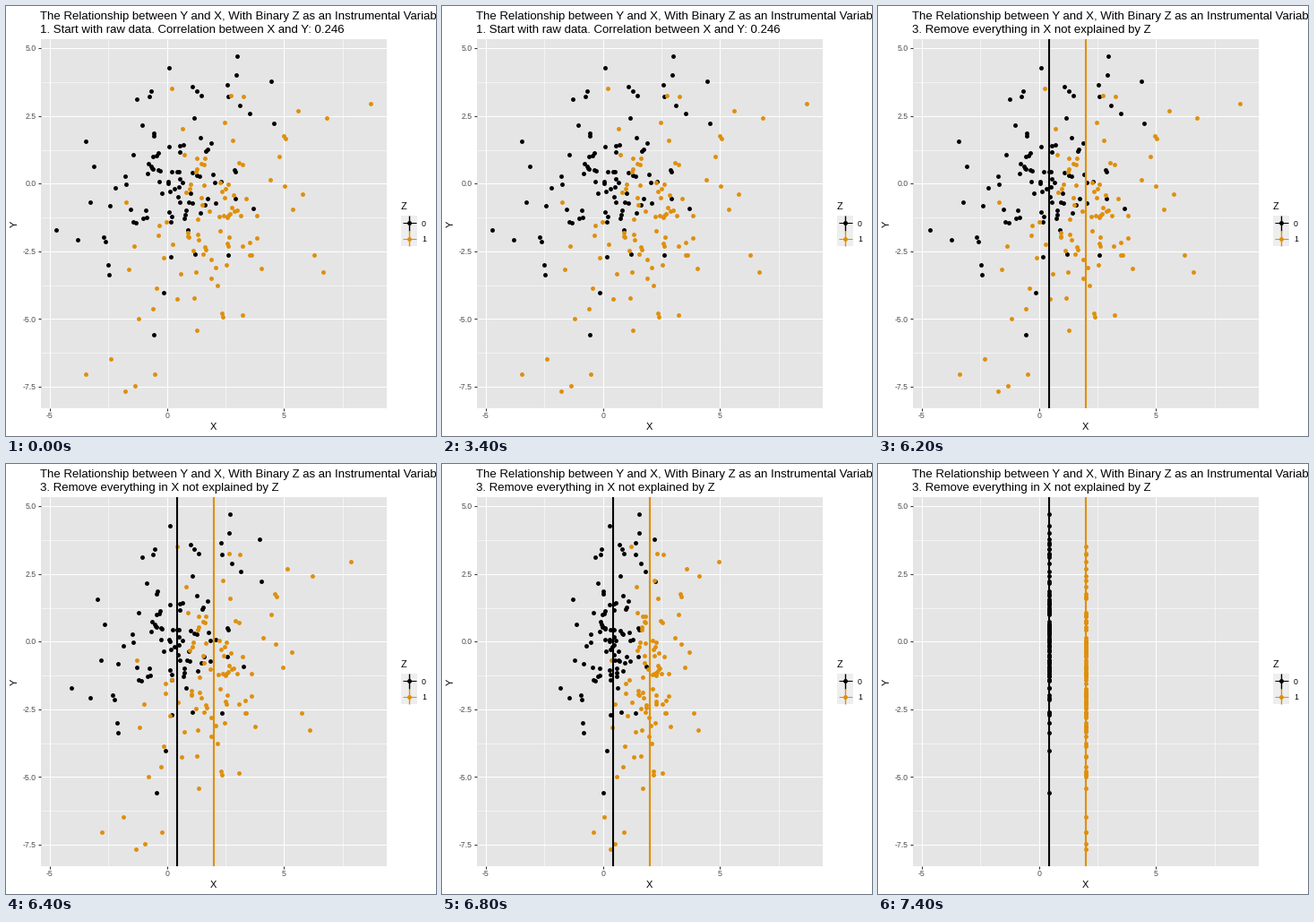
These frames come from a looping animation (480x480 px, 8 s). A matplotlib script:

```python
import numpy as np
import matplotlib.pyplot as plt
from matplotlib.animation import FuncAnimation
from matplotlib.patches import Rectangle

SIZE, DPI = 480, 100
STEP_MS, FRAMES = 100, 80
PT = 72 / DPI  # points per pixel
BLACK, ORANGE = "#000000", "#DF8F0C"
LEFT, RIGHT, TOP, BOTTOM = 38.5, 425, 37.3, 448.7
MEANS = (191, 232)

HEADING = "The Relationship between Y and X, With Binary Z as an Instrumental Variable"
STEPS = (
    "1. Start with raw data. Correlation between X and Y: 0.246",
    "2. Figure out what differences in X are explained by Z",
    "3. Remove everything in X not explained by Z",
)
TITLE_2, LINES_ON, TITLE_3 = 37, 43, 62
MOVE_START, MOVE_LENGTH = 61, 13

plt.rcParams["font.family"] = "Liberation Sans"
fig = plt.figure(figsize=(SIZE / DPI, SIZE / DPI), dpi=DPI, facecolor="white")
ax = fig.add_axes([0, 0, 1, 1])  # drawn in stage pixels, y downwards
ax.set_xlim(0, SIZE)
ax.set_ylim(SIZE, 0)
ax.axis("off")


def px(x):
    return 179.6 + 26.16 * x


def py(y):
    return 198.3 - 30.23 * y


def line(xs, ys, color, width, z=1):
    return ax.plot(xs, ys, color=color, lw=width * PT, zorder=z,
                   solid_capstyle="butt")[0]


def box(x, y, w, h, color):
    ax.add_patch(Rectangle((x, y), w, h, fc=color, ec="none", zorder=0))


def label(x, y, text, size, color="black", **kw):
    return ax.text(x, y, text, fontsize=size * PT, color=color,
                   va=kw.pop("va", "baseline"), **kw)


def dots(xs, ys, color, z=3):
    return ax.plot(xs, ys, "o", ms=4.9 * PT, mew=0, color=color, zorder=z)[0]


def cloud(seed, outer, center, spread, total=100):
    """Outlying points plus a seeded normal core cut off at two sigma."""
    rng = np.random.default_rng(seed)
    core = rng.normal(size=(4 * total, 2))
    core = core[np.hypot(*core.T) < 2][: total - len(outer)]
    return np.vstack([outer, np.array(center) + core * spread])


def draw_panel():
    box(LEFT, TOP, RIGHT - LEFT, BOTTOM - TOP, "#E5E5E5")
    for x in (-2.5, 2.5, 7.5):
        line([px(x)] * 2, [TOP, BOTTOM], "white", 0.55)
    for y in np.arange(-6.25, 4, 2.5):
        line([LEFT, RIGHT], [py(y)] * 2, "white", 0.55)
    for x in (-5, 0, 5):
        line([px(x)] * 2, [TOP, BOTTOM], "white", 1.07)
        line([px(x)] * 2, [BOTTOM, BOTTOM + 2.8], "#333333", 1.07)
        label(px(x), 460, f"{x}", 8.8, "#4D4D4D", ha="center")
    for y in np.arange(-7.5, 6, 2.5):
        line([LEFT, RIGHT], [py(y)] * 2, "white", 1.07)
        line([LEFT - 2.8, LEFT], [py(y)] * 2, "#333333", 1.07)
        label(33.5, py(y) + 3.1, f"{y:.1f}", 8.8, "#4D4D4D", ha="right")
    label(231.8, 473, "X", 11, ha="center")
    label(9.8, 243, "Y", 11, ha="center", va="center", rotation=90)


def draw_legend():
    label(441, 227, "Z", 11)
    for i, color in enumerate((BLACK, ORANGE)):
        y = 242.2 + 17.3 * i
        box(441.4, y - 8.65, 17.3, 17.3, "#EEEEEE")
        line([442.6, 457.5], [y, y], color, 1.07)
        line([450, 450], [y - 8.6, y + 8.6], color, 1.4)
        dots([450], [y], color)
        label(464, y + 3.4, f"{i}", 8.8)


draw_panel()
draw_legend()
label(38.3, 15, HEADING, 13.2)
subtitle = label(38.3, 30, STEPS[0], 13.2)

outer_black = [
    (56, 250), (80, 261), (89, 151), (94, 219), (98, 179), (109, 258),
    (111, 263), (114, 289), (115, 300), (116, 223), (122, 203), (142, 166),
    (146, 104), (152, 133), (160, 101), (162, 95), (182, 69), (165, 367),
    (176, 320), (184, 280), (211, 277), (248, 278), (258, 56), (257, 77),
    (247, 88), (208, 90), (213, 95), (218, 100), (248, 101), (296, 84),
    (299, 131), (272, 120), (261, 111), (276, 226),
]
outer_orange = [
    (407, 109), (358, 125), (326, 117), (310, 145), (312, 148), (305, 168),
    (331, 210), (320, 227), (344, 278), (354, 297), (311, 201), (295, 194),
    (265, 101), (251, 100), (185, 92), (244, 130), (197, 137), (134, 219),
    (143, 268), (137, 294), (148, 349), (117, 394), (89, 411), (133, 430),
    (144, 424), (166, 411), (164, 338), (168, 315), (191, 327), (210, 326),
    (213, 362), (241, 343), (242, 347), (264, 345), (285, 293),
]
clouds = (
    cloud(4, outer_black, (194, 190), (37, 38)),
    cloud(11, outer_orange, (228, 239), (33, 48)),
)
markers = [dots(*c.T, color) for c, color in zip(clouds, (BLACK, ORANGE))]
mean_lines = [line([m, m], [TOP, BOTTOM], color, 2.1, 4)
              for m, color in zip(MEANS, (BLACK, ORANGE))]


def update(frame):
    subtitle.set_text(STEPS[(frame >= TITLE_2) + (frame >= TITLE_3)])
    t = np.clip((frame - MOVE_START) / MOVE_LENGTH, 0, 1)
    eased = (1 - np.cos(np.pi * t)) / 2
    for points, marker, rule, mean in zip(clouds, markers, mean_lines, MEANS):
        x = points[:, 0]
        marker.set_xdata(x + (mean - x) * eased)
        rule.set_visible(frame >= LINES_ON)
    return [subtitle, *markers, *mean_lines]


animation = FuncAnimation(fig, update, frames=FRAMES, interval=STEP_MS,
                          repeat=True, repeat_delay=0, blit=False)
plt.show()
```
